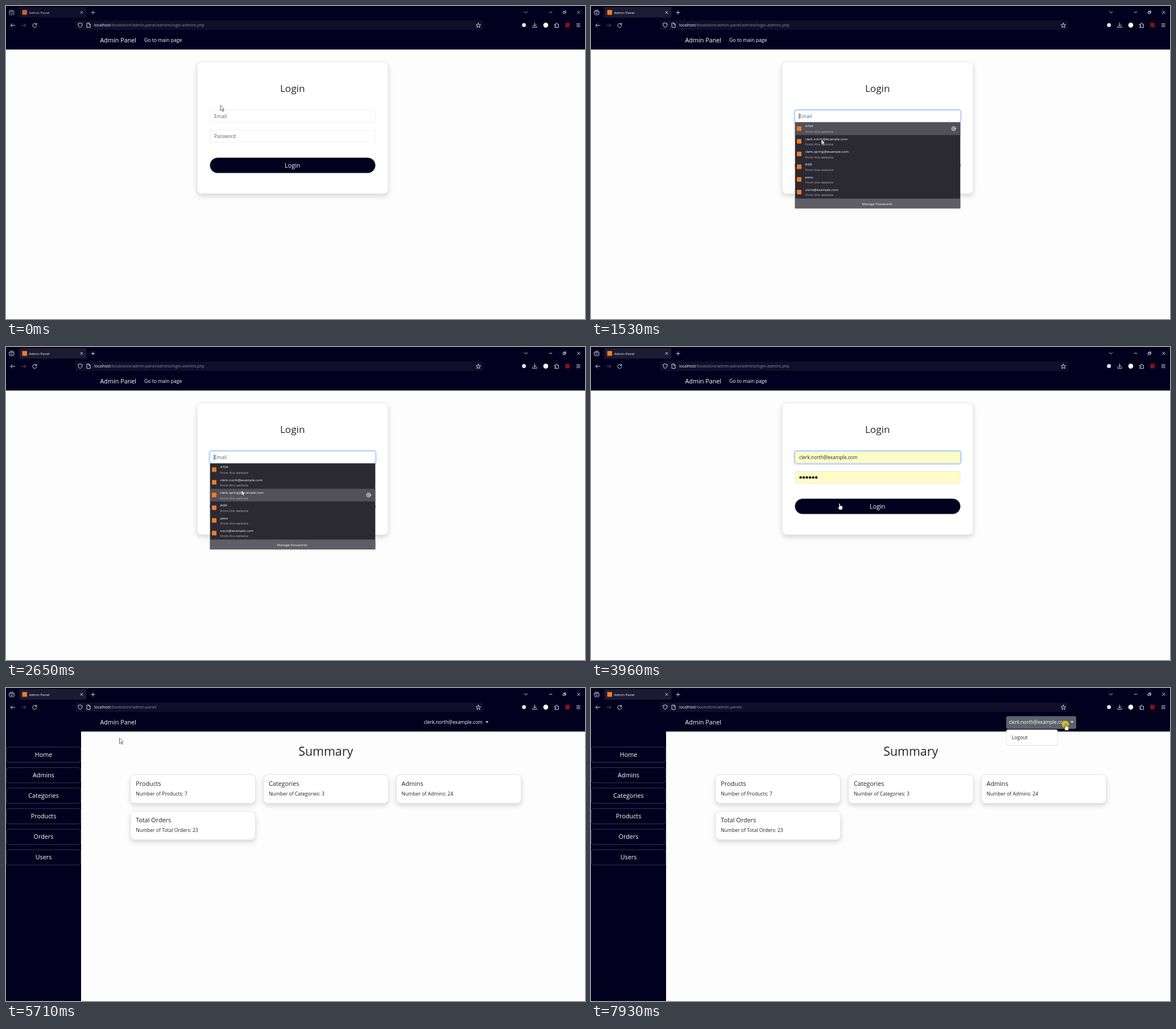
These frames come from a looping animation (1018 px wide and 550 px high, 8 s). An HTML page:

```html
<!DOCTYPE html>
<html lang="en">
<head>
<meta charset="utf-8">
<title>Admin Panel</title>
<style>
  html, body { margin: 0; width: 100%; height: 100%; overflow: hidden; background: #fdfdfd; }
  svg { display: block; width: 100%; height: 100%; }
  text { font-family: "Open Sans", "Noto Sans", sans-serif; white-space: pre; }
  .card { fill: #fff; stroke: #d9dbdf; stroke-width: .7; filter: drop-shadow(0 4px 4px rgba(0, 0, 0, .15)); }
  .icon { fill: none; stroke: #e9e9f2; stroke-width: .9; stroke-linecap: round; stroke-linejoin: round; }
</style>
</head>
<body>
<svg id="stage"></svg>
<script>
const NAVY = '#01001e', INK = '#212529', PALE = '#fbfbfe', ORANGE = '#ee7b28';
const MAIL = 'clerk.north@example.com';
const LOGINS = ['4704', MAIL, 'clerk.spring@example.com', 'jkljlk', 'pexo', 'socio@example.com'];
const ROW_TOP = 204.5, ROW_H = 22.3;

const text = (x, y, s, size, fill, more = '') =>
  `<text x="${x}" y="${y}" font-size="${size}" fill="${fill}" ${more}>${s}</text>`;
const mid = (x, y, s, size, fill, more = '') => text(x, y, s, size, fill, `text-anchor="middle" ${more}`);
const rect = (x, y, w, h, r, fill, more = '') =>
  `<rect x="${x}" y="${y}" width="${w}" height="${h}" rx="${r}" fill="${fill}" ${more}/>`;
const dot = (x, y, r, fill, more = '') => `<circle cx="${x}" cy="${y}" r="${r}" fill="${fill}" ${more}/>`;
const icon = (x, y, d, more = '') => `<path class="icon" transform="translate(${x} ${y})" d="${d}" ${more}/>`;
const group = (id, ...parts) => `<g id="${id}">${parts.join('')}</g>`;
const card = (x, y, w, h) => `<rect class="card" x="${x}" y="${y}" width="${w}" height="${h}" rx="8"/>`;

const chrome = [
  rect(0, 0, 1018, 76.5, 0, NAVY),
  rect(22, 0, .6, 22, 0, '#23223c'),
  rect(24, 2, 117.5, 18.5, 2, '#1c1b33', 'id="tab"'),
  rect(122, 25.5, 716.5, 16.5, 2, '#100f2a'),
  group('bar',
    rect(28.5, 7, 8.5, 8.5, 1, ORANGE, 'id="favicon"'),
    text(40.5, 13.7, 'Admin Panel', 6.1, PALE),
    icon(133, 11.3, 'M-2 -2L2 2M2 -2L-2 2', 'stroke-width=".7"'),
    icon(10, 11.3, 'M-3 -3.8H3M-4 -1.8H4V2.6Q4 4 2.6 4H-2.6Q-4 4 -4 2.6ZM-1.6 1.2H1.6'),
    icon(153, 11.5, 'M-3 0H3M0 -3V3'),
    icon(914, 11, 'M-2.8 -1.4L0 1.4L2.8 -1.4'),
    icon(957.5, 11, 'M-2.3 0H2.3'),
    icon(982, 11, 'M-2.3 -1H1V2.3H-2.3ZM-1 -1V-2.3H2.3V1H1', 'stroke-width=".7"'),
    icon(1006.8, 11.2, 'M-2.4 -2.4L2.4 2.4M2.4 -2.4L-2.4 2.4', 'stroke-width=".7"')),
  icon(12, 34, 'M3.8 0H-3.8M-.8 -3L-3.8 0L-.8 3'),
  icon(31, 34, 'M-3.8 0H3.8M.8 -3L3.8 0L.8 3', 'opacity=".38"'),
  icon(50.5, 34, 'M3 -2A3.6 3.6 0 1 0 3.6 .6M3.4 -4V-1.4H.8', 'id="reload"'),
  icon(130.5, 33.8, 'M0 -4L3.6 -2.7Q3.8 2.2 0 4Q-3.8 2.2 -3.6 -2.7Z'),
  icon(145.3, 33.8, 'M-2.8 -3.8H.6L2.8 -1.6V3.8H-2.8ZM.6 -3.8V-1.6H2.8'),
  icon(830.5, 34, 'M0 -4L1.2 -1.3L4 -1L1.9 .9L2.5 3.8L0 2.3L-2.5 3.8L-1.9 .9L-4 -1L-1.2 -1.3Z', 'stroke-width=".8"'),
  dot(910.7, 33.6, 3.5, '#e0e0ea'),
  icon(929.6, 33.6, 'M0 -4V1.6M-2.5 -.8L0 1.7L2.5 -.8M-3.6 2V3.8H3.6V2'),
  dot(949, 33.6, 4.3, '#fff'),
  icon(968.3, 33.8, 'M-3.4 -1.6H-1.4V-2.6A1.2 1.2 0 0 1 1 -2.6V-1.6H3.2V3.8H-3.4V2.2H-2.4A1.1 1.1 0 0 0 -2.4 0H-3.4Z'),
  rect(983.3, 29.6, 7.6, 8, 1, '#8c0d1b'),
  icon(1006.3, 33.6, 'M-3 -2.6H3M-3 0H3M-3 2.6H3'),
  `<text x="155" y="36.4" font-size="6.96" fill="#8d8c9e"><tspan fill="${PALE}">localhost</tspan><tspan id="path"></tspan></text>`,
  text(165.5, 64, 'Admin Panel', 10.8, '#fff')
].join('');

const login = group('login',
  text(243, 63.2, 'Go to main page', 8.64, '#fff'),
  card(336, 98, 336, 232),
  mid(503.7, 151, 'Login', 17.2, INK),
  rect(357.4, 182, 293.2, 23.6, 4.2, 'none', 'id="ring" stroke="#0d6efd" stroke-opacity=".25" stroke-width="2.2"'),
  rect(358.7, 183.3, 290.6, 21, 3, '#fff', 'id="email" stroke-width=".6"'),
  rect(358.7, 218.5, 290.6, 21, 3, '#fff', 'id="pass" stroke="#dee2e6" stroke-width=".6"'),
  group('hints', text(366, 196.6, 'Email', 8.7, '#5a6067'), text(366, 231.7, 'Password', 8.45, '#5a6067')),
  group('values', text(366, 196.6, MAIL, 8.4, INK),
    ...[0, 1, 2, 3, 4, 5].map(i => dot(368.6 + i * 5.5, 229.2, 2.2, '#16181b'))),
  rect(365.6, 188.3, .7, 10.5, 0, '#111', 'id="caret"'),
  rect(358.7, 266.7, 290.6, 26.6, 13.3, NAVY, 'stroke="#4b4e62" stroke-width=".6"'),
  mid(503.8, 283.6, 'Login', 10.8, '#fff'),
  group('list',
    rect(358.7, ROW_TOP, 290.6, 151, 0, '#2b2a33'),
    rect(358.7, ROW_TOP, 290.6, ROW_H, 0, '#52515a', 'id="pick"'),
    ...LOGINS.map((name, i) => {
      const y = ROW_TOP + i * ROW_H;
      return rect(362, y + 7, 8, 8, 1, ORANGE) + text(376.5, y + 8.9, name, 6.1, PALE) +
        text(376.5, y + 18.4, 'From this website', 6, '#b0afb7');
    }),
    `<g id="gear" class="icon">${dot(0, 0, 3.1, 'none')}${dot(0, 0, 1.2, 'none')}` +
    dot(0, 0, 3.9, 'none', 'stroke-linecap="butt" style="stroke-dasharray:1.5 1.56;stroke-linecap:butt"') + '</g>',
    rect(358.7, 338.3, 290.6, 17.2, 0, '#5f5e66'),
    mid(503.2, 349.8, 'Manage Passwords', 5.95, PALE)));

const stats = [['Products', 7], ['Categories', 3], ['Admins', 24], ['Total Orders', 23]];
const summary = group('summary',
  rect(0, 76, 132, 474, 0, NAVY),
  ...['Home', 'Admins', 'Categories', 'Products', 'Orders', 'Users'].map((name, i) =>
    rect(.3, 103.7 + i * 36.1, 131.4, 26.8, 5, 'none', 'stroke="#5e6172" stroke-width=".6"') +
    mid(66, 120.9 + i * 36.1, name, 10.8, '#fff')),
  mid(562.2, 119, 'Summary', 21.4, INK),
  ...stats.map(([name, n], i) => {
    const x = 219 + i % 3 * 233.7, y = 152.3 + (i > 2) * 64.2;
    return card(x, y, 219.5, 50.2) + text(x + 9.2, y + 19.7, name, 10.8, INK) +
      text(x + 9.2, y + 36.6, `Number of ${name}: ${n}`, 8.6, INK);
  }),
  rect(730, 49.5, 123, 22.3, 3, '#5c636a', 'id="hover"'),
  text(734.7, 63.2, MAIL, 8.45, '#fff'),
  '<path d="M843 58.4H848.4L845.7 61.2Z" fill="#fff"/>',
  group('menu', rect(730.3, 73.2, 90, 27.5, 3, '#fff', 'stroke="#cfd0d3" stroke-width=".6"'),
    text(739.8, 89.7, 'Logout', 8.6, INK)));

const pointer = dot(0, 0, 6.2, '#e8d400', 'id="click" opacity=".75"') +
  group('cursor',
    '<path id="arrow" d="M0 0V9.6L2.3 7.5L4 11L5.5 10.3L3.9 7H6.6Z" fill="#fff" stroke="#000" stroke-width=".6"/>',
    '<path id="hand" d="M-1 .8Q0 -.5 1 .8V4.2L4.6 5.1Q5.6 5.5 5.4 7L4.7 11.5H-.6L-3 7.6Q-3.2 6.2 -1.9 6.8L-1 7.6Z" fill="#fff" stroke="#000" stroke-width=".6"/>',
    '<path id="beam" d="M-1.5 -5H1.5M0 -5V5M-1.5 5H1.5" fill="none" stroke="#000" stroke-width=".7"/>');

document.getElementById('stage').innerHTML = chrome + login + summary + pointer;

const el = id => document.getElementById(id);
const show = (id, on) => el(id).style.display = on ? '' : 'none';
const set = (id, name, value) => el(id).setAttribute(name, value);

// time, x, y of the pointer's hot spot
const TRACK = [
  [0, 377, 174.5], [140, 377, 174.5], [840, 392, 190], [1320, 392, 190], [1460, 399, 214], [1530, 405, 234],
  [1810, 410, 275], [2150, 414, 311], [2400, 414, 290], [2650, 414, 251.5], [2930, 412, 238],
  [3330, 412, 238], [3960, 437, 274.5], [4310, 437, 274.5], [4590, 364, 267.5], [4870, 341, 259],
  [5710, 199, 88], [6150, 430, 64], [6550, 686, 72], [6760, 815, 76.5], [6970, 841, 65],
  [7390, 847, 62.5], [7600, 834.7, 63], [8000, 834.7, 63]
];
const CLICKS = [[1040, 140], [3260, 140], [4100, 140], [7110, 140], [7930, 70]];

function at(t) {
  const i = Math.max(1, TRACK.findIndex(k => k[0] >= t));
  const [t0, x0, y0] = TRACK[i - 1], [t1, x1, y1] = TRACK[i];
  const p = Math.max(0, (t - t0) / (t1 - t0));
  return [x0 + (x1 - x0) * p, y0 + (y1 - y0) * p];
}

function draw(now) {
  const t = now % 8000, [x, y] = at(t);
  const inside = (x0, y0, x1, y1) => x >= x0 && x <= x1 && y >= y0 && y <= y1;
  const home = t >= 4310, filled = t >= 3260, open = t >= 1110 && !filled, active = t >= 140;
  const focus = Math.min(1, Math.max(0, (t - 1040) / 150));
  const loading = t >= 4240;

  set('tab', 'fill', active ? '#1c1b33' : '#11102a');
  set('bar', 'opacity', active ? 1 : .8);
  show('favicon', !(loading && t < 4800));
  set('reload', 'opacity', loading && t < 5000 ? .38 : 1);
  el('path').textContent = '/bookstore/admin-panel/' + (loading ? '' : 'admins/login-admins.php');

  show('login', !home);
  show('summary', home);
  set('ring', 'opacity', focus);
  set('email', 'stroke', focus > .5 ? '#86b7fe' : '#dee2e6');
  for (const id of ['email', 'pass']) set(id, 'fill', filled ? '#fffcc8' : '#fff');
  show('hints', !filled);
  show('values', filled);
  show('caret', t >= 1040 && !filled && (t < 1750 || (t - 1250) % 1000 < 500));

  show('list', open);
  const row = Math.floor((at(Math.max(0, t - 70))[1] - ROW_TOP) / ROW_H);
  const picked = row >= 0 && row < LOGINS.length, top = ROW_TOP + row * ROW_H;
  show('pick', picked);
  show('gear', picked);
  set('pick', 'y', top);
  set('gear', 'transform', `translate(637.6 ${top + 11})`);

  const over = home && inside(730, 49, 853, 72);
  show('hover', over);
  show('menu', t >= 7180);

  const hand = over || !home && inside(358, 266, 650, 294);
  const beam = !home && (inside(358, 183, 650, 204.5) || !open && inside(358, 218, 650, 239.5));
  show('hand', hand);
  show('beam', beam);
  show('arrow', !hand && !beam);
  set('cursor', 'transform', `translate(${x} ${y})`);
  set('click', 'transform', `translate(${x - .5} ${y + 1})`);
  show('click', CLICKS.some(([start, span]) => t >= start && t < start + span));
  requestAnimationFrame(draw);
}
draw(performance.now());
</script>
</body>
</html>
```
